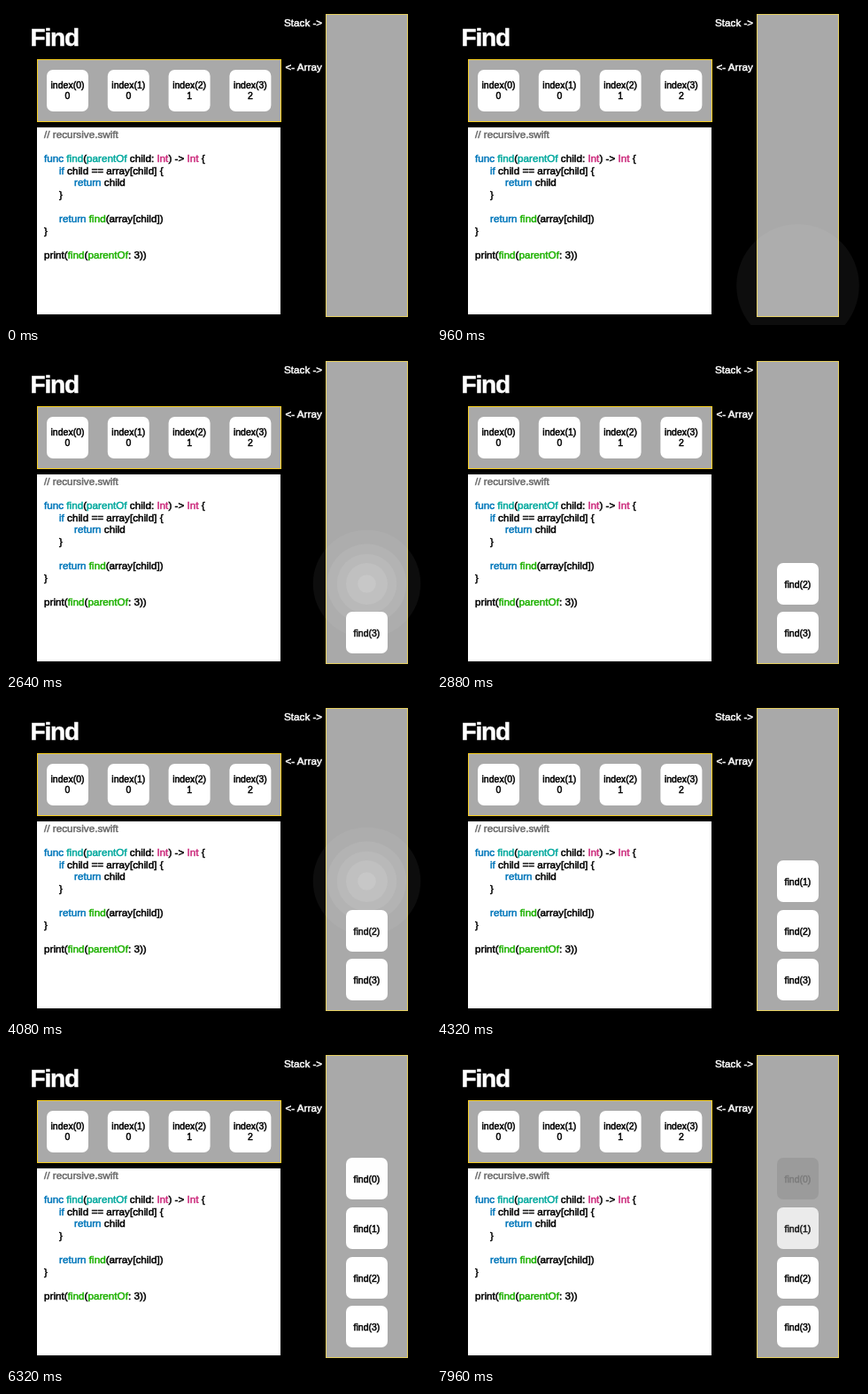
These frames come from a looping animation (480x360 px, 8 s). An HTML page:

```html
<!DOCTYPE html>
<html lang="en">
<head>
<meta charset="utf-8">
<style>
  html, body { margin: 0; width: 100%; height: 100%; overflow: hidden; background: #000; }
  svg { display: block; }
  text { font: 11.7px "Liberation Sans", Arial, sans-serif; white-space: pre; fill: #000; stroke: #000; stroke-width: .5; }
  .white { fill: #fff; stroke: #fff; }
  .title { font-size: 28px; font-weight: bold; letter-spacing: -1.2px; }
  .label { font-size: 10.5px; text-anchor: middle; }
  .comment { fill: #6a6a6a; stroke: #6a6a6a; }
  .key { fill: #0076ba; stroke: #0076ba; }
  .decl { fill: #00a89d; stroke: #00a89d; }
  .call { fill: #1db100; stroke: #1db100; }
  .type { fill: #cb297b; stroke: #cb297b; }
</style>
</head>
<body>
<svg id="stage" width="480" height="360" viewBox="0 0 480 360">
  <text class="white title" x="27.5" y="45">Find</text>
  <text class="white" x="314" y="22.5">Stack -&gt;</text>
  <text class="white" x="315.5" y="72.5">&lt;- Array</text>
  <rect x="35.5" y="60.5" width="275" height="70" fill="#a9a9a9" stroke="#f7ce20"/>
  <rect x="361.5" y="9.5" width="92" height="341" fill="#a9a9a9" stroke="#e6d060"/>
  <rect x="35" y="137" width="275" height="211" fill="#fff"/>
</svg>
<script>
const LOOP = 8000, BEAT = 1440, SIZE = 47;
const BLUR_RATE = .114;                                  // px of blur per ms left
const BLUR_STEPS = [40, 80, 120, 240, 320, 400, 480, 640]; // ms before a box is sharp
const FADE_START = 6280, FADE_TIME = 840;
const stage = document.getElementById("stage");
const callTop = i => Math.round(292.3 - i * 55.7);

function add(parent, tag, attrs, text = "") {
  const el = document.createElementNS("http://www.w3.org/2000/svg", tag);
  for (const name in attrs) el.setAttribute(name, attrs[name]);
  el.textContent = text;
  return parent.appendChild(el);
}

function addBox(x, y, lines) {
  const group = add(stage, "g", {});
  const rect = add(group, "rect", { x, y, width: SIZE, height: SIZE, rx: 7, fill: "#fff" });
  const first = y + 27.5 - (lines.length - 1) * 6.5;
  const labels = lines.map((line, i) =>
    add(group, "text", { class: "label", x: x + SIZE / 2, y: first + i * 12 }, line));
  return { group, rect, label: labels[0] };
}

[0, 0, 1, 2].forEach((parent, i) => addBox(46 + i * 68.8, 72, [`index(${i})`, parent]));

// Code lines: row, indent, then "style|text" pieces
const code = [
  [0, 0, "comment|// recursive.swift"],
  [2, 0, "key|func ", "decl|find", "|(", "decl|parentOf", "| child: ", "type|Int", "|) -> ", "type|Int", "| {"],
  [3, 1, "key|if", "| child == array[child] {"],
  [4, 2, "key|return", "| child"],
  [5, 1, "|}"],
  [7, 1, "key|return ", "call|find", "|(array[child])"],
  [8, 0, "|}"],
  [10, 0, "|print(", "call|find", "|(", "call|parentOf", "|: 3))"]
];
for (const [row, indent, ...parts] of code) {
  const line = add(stage, "text", { x: 43 + indent * 17, y: 149 + row * 13.6 });
  for (const part of parts) {
    const [style, text] = part.split("|");
    add(line, "tspan", { class: style }, text);
  }
}

const calls = [3, 2, 1, 0].map((n, i) => addBox(384, callTop(i), [`find(${n})`]));
const rings = [0, 1, 2, 3, 4].map(k =>
  add(stage, "circle", { cx: 407.5, fill: "#fff", "fill-opacity": .05 + .015 * k }));

// A strongly blurred box shows as contour rings of a Gaussian.
function drawRings(index, blur) {
  const variance = blur * blur + SIZE * SIZE / 12;
  const peak = SIZE * SIZE / (2 * Math.PI * variance);
  rings.forEach((ring, k) => {
    const level = .052 + .076 * k;
    ring.setAttribute("cy", callTop(index) + SIZE / 2);
    ring.setAttribute("r", peak > level ? Math.sqrt(2 * variance * Math.log(peak / level)) : 0);
  });
}

const gray = v => `rgb(${v},${v},${v})`;

function draw(t) {
  rings.forEach(ring => ring.setAttribute("r", 0));
  calls.forEach(({ group, rect, label }, i) => {
    const left = BEAT * (i + 1) - t;
    const step = left > 0 ? BLUR_STEPS.find(s => s >= left) : 0;
    const blur = step * BLUR_RATE;
    const soft = step >= 240;
    if (soft) drawRings(i, blur);
    group.style.display = step === undefined || soft ? "none" : "";
    group.style.filter = step ? `blur(${blur}px)` : "none";

    const p = Math.min(1, Math.max(0, (t - FADE_START - (3 - i) * BEAT) / FADE_TIME));
    const fade = p * p * (3 - 2 * p);
    rect.style.fill = gray(255 - 100 * fade);
    label.style.fill = label.style.stroke = gray(124 * fade);
  });
}

function frame() {
  draw(performance.now() % LOOP);
  requestAnimationFrame(frame);
}
frame();
</script>
</body>
</html>
```
